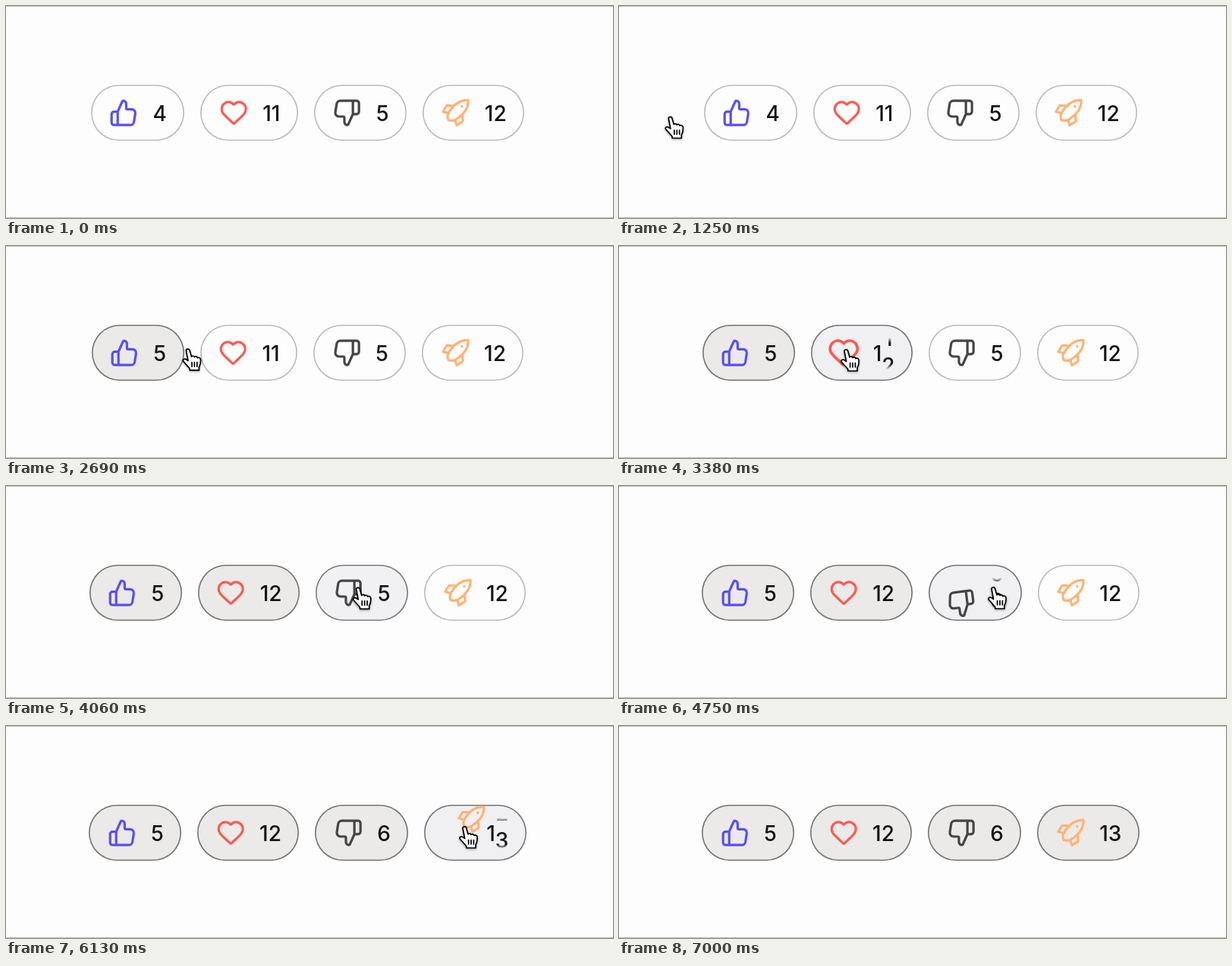
An HTML page for the animation above (7060 ms loop, 800 by 280 pixels).

```html
<!DOCTYPE html>
<html lang="en">
<head>
<meta charset="utf-8">
<title>Reaction buttons</title>
<style>
  html, body { margin: 0; width: 100%; height: 100%; overflow: hidden; background: #fefdfe; }
  #stage {
    position: relative; box-sizing: border-box; width: 800px; height: 280px; overflow: hidden;
    border: solid #b9b9bc; border-width: 1px 0;
    font: 500 28px/36px Inter, sans-serif; color: #141416;
  }
  #row { position: absolute; left: 0; top: 103px; width: 795px; display: flex; justify-content: center; gap: 21px; }
  .pill {
    display: flex; align-items: center; box-sizing: border-box; height: 74px;
    padding: 0 23.5px 0 24.4px; border-radius: 37px; flex: none;
  }
  .icon {
    width: 38.4px; height: 38.4px; margin-right: 19px; overflow: visible;
    fill: none; stroke-width: 2; stroke-linecap: round; stroke-linejoin: round;
  }
  .count { display: flex; margin-top: 1px; }
  .slot {
    position: relative; height: 42px; margin: -3px 0; overflow: hidden;
    -webkit-mask-image: linear-gradient(transparent, #000 7px, #000 35px, transparent);
    mask-image: linear-gradient(transparent, #000 7px, #000 35px, transparent);
  }
  .slot span { position: absolute; left: 50%; top: 3px; }
  #hand { position: absolute; left: 0; top: 0; overflow: visible; filter: drop-shadow(0 1.5px 1.5px #0006); }
</style>
</head>
<body>
<div id="stage">
  <div id="row"></div>
  <svg id="hand" width="26" height="31" fill="#fff" stroke="#000" stroke-width="1.7" stroke-linecap="round" stroke-linejoin="round">
    <path d="M5 3C5 .5 9 .3 9.6 2.5L12 11C12.5 9.8 15.5 9.6 16 11.6C16.8 10.4 19.4 10.4 19.8 12.6C21 11.6 23.6 12.2 24 14.4C24.4 18 24 21 22 25V29H10L9.6 26.5C6 22.5 3.5 19.5 1.2 17C.2 15 2.8 13.2 4.8 14.6L7.6 16.5Z"/>
    <path d="M12.6 18.5v5.5M16 18.5v5.5M19.4 18.5v5.5"/>
  </svg>
</div>
<script>
const LOOP = 7060;
const thumb = 'M7 22V11M2 13V20C2 21.1 2.9 22 4 22H17.43C18.9 22 20.17 20.92 20.39 19.46L21.47 12.46C21.75 10.64 20.34 9 18.5 9H15C14.45 9 14 8.55 14 8V4.47C14 3.1 12.9 2 11.53 2C11.2 2 10.9 2.2 10.78 2.49L7.26 10.4C7.1 10.77 6.75 11 6.35 11H4C2.9 11 2 11.9 2 13Z';
const heart = 'M12 5.14C10 2.8 6.66 2.17 4.15 4.31C1.65 6.45 1.3 10.03 3.26 12.56C4.9 14.67 9.85 19.1 11.47 20.54Q12 21.1 12.51 20.54C14.14 19.1 19.09 14.67 20.72 12.56C22.69 10.03 22.38 6.43 19.83 4.31C17.28 2.19 14 2.8 12 5.14Z';
const rocket = 'M22.5 1.5C16 1 11 4.5 6.5 11.8C5.3 14 5.2 15.5 6.2 17.8C8.5 18.8 10 18.7 12.2 17.5C19.5 13 23 8 22.5 1.5ZM10 6.2L5 5.8L1.8 11L6 12.2M17.8 14L18.2 19L13 22.2L11.8 18M17.4 6.4v.4';

const clamp = v => Math.max(0, Math.min(1, v));
const ramp = (t, from, length) => clamp((t - from) / length);
const ease = p => p * p * (3 - 2 * p);
const lerp = (a, b, p) => a + (b - a) * p;
const mix = (a, b, p) => a.map((v, i) => lerp(v, b[i], p));
const rgb = c => `rgb(${c})`;
const bump = t => Math.sin(Math.PI * ramp(t, 0, 450));
const roll = t => t <= 0 ? 0 : 1 - (1 + t / 62) * Math.exp(-t / 62);
const flight = t => 20 * Math.sin(Math.PI * ramp(t, 0, 960) ** 0.6);

// Times in ms: pointer enters, clicks, leaves.
const pills = [
  { path: thumb, color: '#5a4ff0', lead: '', from: 4, to: 5, enter: 1480, click: 1895, leave: 2580,
    move: t => `translate(0 ${-15 * bump(t)}) rotate(${-8 * bump(t)} 19.2 19.2)` },
  { path: heart, color: '#fb5b52', lead: '1', from: 1, to: 2, enter: 2680, click: 3268, leave: 3800,
    move: t => { const s = 1 + 0.18 * bump(t); return `translate(${19.2 * (1 - s)} ${19.2 * (1 - s)}) scale(${s})`; } },
  { path: thumb, turn: 180, color: '#454547', lead: '', from: 5, to: 6, enter: 3900, click: 4590, leave: 5560,
    move: t => `translate(0 ${16 * bump(t)}) rotate(${-8 * bump(t)} 19.2 19.2)` },
  { path: rocket, color: '#ffb377', lead: '1', from: 2, to: 3, enter: 5610, click: 5965, leave: 6580,
    move: t => `translate(${flight(t)} ${-flight(t)})` },
];

// Pointer stops: time, x, y of the fingertip.
const stops = [
  [1130, 55, 148], [1700, 161, 135], [2440, 161, 135], [2900, 299, 137],
  [3480, 299, 137], [4250, 493, 134], [5330, 493, 134], [5850, 604, 133],
  [6300, 604, 133], [6700, 664, 142],
];

const row = document.getElementById('row');
const hand = document.getElementById('hand');
const pen = document.createElement('canvas').getContext('2d');
pen.font = '500 28px Inter, sans-serif';

for (const p of pills) {
  const el = document.createElement('div');
  el.className = 'pill';
  el.innerHTML = `<svg class="icon" stroke="${p.color}"><g><path transform="scale(1.6) rotate(${p.turn || 0} 12 12)" d="${p.path}"/></g></svg>
    <div class="count">${p.lead}<div class="slot"><span>${p.from}</span><span>${p.to}</span></div></div>`;
  row.append(el);
  p.el = el;
  p.icon = el.querySelector('g');
  p.slot = el.querySelector('.slot');
  p.digits = el.querySelectorAll('span');
  p.widths = [p.from, p.to].map(d => pen.measureText(d).width);
}

function drawPill(p, t) {
  const over = ease(ramp(t, p.enter, 200)), done = ease(ramp(t, p.leave, 130));
  const fill = mix(mix([254, 253, 254], [240, 239, 241], over), [235, 234, 232], done);
  const edge = mix([187, 186, 190], [118, 117, 120], over);
  p.el.style.background = rgb(fill);
  p.el.style.boxShadow = `inset 0 0 0 1.6px ${rgb(edge)}`;
  const age = t - p.click, turn = roll(age);
  p.icon.setAttribute('transform', p.move(age));
  p.slot.style.width = lerp(...p.widths, ease(ramp(age, 0, 120))) + 'px';
  p.digits.forEach((d, i) => {
    d.style.transform = `translate(-50%, ${36 * (i - turn)}px)`;
  });
}

function drawHand(t) {
  const i = stops.findIndex((s, n) => n && t < s[0]);
  const [a, b] = i < 0 ? [stops.at(-1), stops.at(-1)] : [stops[i - 1], stops[i]];
  const p = a === b ? 1 : ease(ramp(t, a[0], b[0] - a[0]));
  hand.style.transform = `translate(${lerp(a[1], b[1], p) - 7}px, ${lerp(a[2], b[2], p) - 2}px)`;
  hand.style.opacity = ramp(t, 1130, 120) * (1 - ramp(t, 6600, 120));
}

function frame(now) {
  const t = now % LOOP;
  pills.forEach(p => drawPill(p, t));
  drawHand(t);
  requestAnimationFrame(frame);
}
requestAnimationFrame(frame);
</script>
</body>
</html>
```
